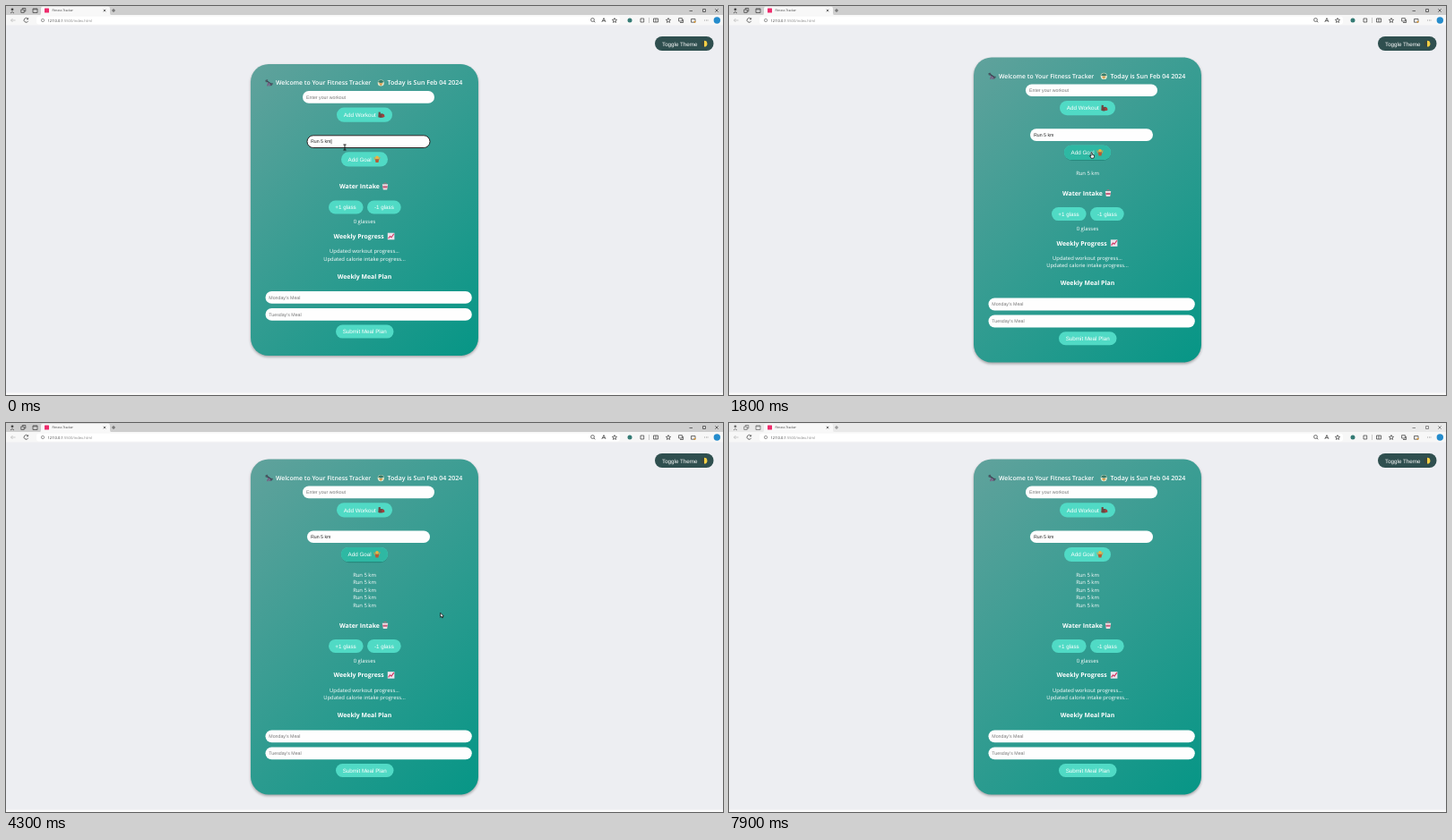
These frames come from a looping animation (800 px wide and 435 px high, 8000 ms). An HTML page:

```html
<!DOCTYPE html>
<html lang="en">
<head>
<meta charset="utf-8">
<title>Fitness Tracker</title>
<style>
  html, body { margin: 0; width: 100%; height: 100%; overflow: hidden; background: #edeef2; }
  svg { display: block; width: 800px; height: 435px; }
  text { font: 5.86px "Open Sans", "Noto Sans", sans-serif; fill: #fff; text-rendering: geometricPrecision; }
  .mid { text-anchor: middle; }
  .head { font-size: 6.9px; font-weight: 700; }
  .btn text { font: 6.25px "Liberation Sans", Arial, sans-serif; }
  .btn rect { fill: #50dac5; }
  .field rect { fill: #fefefe; }
  .field text { font: 5.25px "Liberation Sans", Arial, sans-serif; fill: #777; }
  .field .typed { fill: #222; }
  .line { fill: none; stroke: #4a4a4a; stroke-width: .8; }
  .faint { stroke: #bbb; }
</style>
</head>
<body>
<svg viewBox="0 0 800 435">
  <defs>
    <linearGradient id="teal" gradientUnits="userSpaceOnUse">
      <stop stop-color="#60a29c"/><stop offset="1" stop-color="#069686"/>
    </linearGradient>
    <filter id="soft" x="-10%" y="-10%" width="120%" height="120%"><feGaussianBlur stdDeviation="1.8"/></filter>
  </defs>
  <rect width="800" height="435" fill="#edeef2"/>
  <path d="M0 433.8H800" stroke="#fafafa" stroke-width="2.4"/>

  <!-- browser window -->
  <rect id="strip" width="800" height="11"/>
  <rect y="10" width="800" height="11.5" fill="#f7f7f7"/>
  <path d="M37 10.5Q39 10 39 8V3Q39 .8 41 .8H114Q116 .8 116 3V8Q116 10 118 10.5Z" fill="#f8f8f8"/>
  <rect x="34" y="11.8" width="651" height="8.6" rx="3" fill="#fff"/>
  <g id="tabIcons">
    <path class="line" d="M5 8Q7 5 9 8M16.8 4H20.2V7.4H16.8ZM18.3 4V2.5H21.8V6H20.2M30 3H35V7.5H30ZM30 3.7H35M118 5H122M120 3V7M762.5 5.5H766M777.5 3.5H780.5V6.5H777.5ZM791.3 3.3L794.7 6.7M794.7 3.3L791.3 6.7"/>
    <circle cx="7" cy="3.8" r="1.4" fill="#444"/>
  </g>
  <rect x="43" y="2.5" width="5" height="5" rx=".5" fill="#ee2c6c"/>
  <text x="51.5" y="6.3" style="font-size:3.4px;fill:#333">Fitness Tracker</text>
  <path class="line" d="M108.7 3.8L111.2 6.3M111.2 3.8L108.7 6.3"/>
  <path class="line faint" d="M5.5 16H10.5M7.5 14L5.5 16L7.5 18M717.5 13V19"/>
  <path class="line" d="M24.4 14.4A2.4 2.4 0 1 0 24.7 16.8M24.7 13.3V14.8H23"/>
  <circle class="line" cx="41" cy="16" r="1.7" style="stroke-width:.5"/>
  <text x="46.5" y="17.6" style="font-size:4.1px;fill:#333">127.0.0.1<tspan fill="#888">:5500/index.html</tspan></text>
  <path class="line" d="M656 17L657.3 18.3M664.8 18L667 13.5L669 18M665.7 16.5H668.3M679 13.5L679.8 15.2L681.6 15.4L680.2 16.6L680.6 18.4L679 17.5L677.4 18.4L677.8 16.6L676.4 15.4L678.2 15.2ZM708 14H711.7V18H708ZM722.5 14H727.5V18H722.5ZM725 14V18M739 13.5L739.8 15.2L741.6 15.4L740.2 16.6L740.6 18.4L739 17.5L737.4 18.4L737.8 16.6L736.4 15.4L738.2 15.2ZM750.6 13.7H754.4V17H750.6ZM752 18.5H755.6V15M764.5 14.5H769V18.2H764.5ZM779.3 16H779.9M781 16H781.6M782.7 16H783.3"/>
  <circle class="line" cx="654.5" cy="15.5" r="1.9"/>
  <circle cx="696" cy="16" r="2.5" fill="#347b74"/>
  <circle cx="768.5" cy="17.8" r="1" fill="#e79a27"/>
  <circle cx="793.3" cy="16" r="3.7" fill="#258ccc"/>

  <!-- theme switch -->
  <g class="btn">
    <rect x="724" y="34" width="65.5" height="16" rx="8" style="fill:#2f4f4f"/>
    <text x="732" y="44.5">Toggle Theme</text>
    <path d="M779 38.8A3.4 3.4 0 0 1 779 45.6Z" fill="#f5cf45"/>
    <path d="M779 38.8A3.4 3.4 0 0 0 779 45.6Z" fill="#39483f"/>
  </g>

  <rect id="shadow" x="273" width="254" rx="20" fill="#000" opacity=".32" filter="url(#soft)"/>
  <rect id="card" x="273" width="254" rx="20" fill="url(#teal)"/>

  <g id="upper">
    <g transform="translate(293.5 86)">
      <path d="M-3.8 -3L3.5 2" stroke="#35434c" stroke-width="1.3"/>
      <path d="M-3.5 -1L-1.8 -3.6M2 3L3.9 .3" stroke="#4d5a66" stroke-width="1.5"/>
      <path d="M-.5 -.5L-1.8 3.5M.8 .5L.8 3.5" stroke="#7c5a83" stroke-width="1.4"/>
    </g>
    <text x="301" y="88.4" style="font-size:6.8px;font-weight:600">Welcome to Your Fitness Tracker</text>
    <g transform="translate(418.3 86)">
      <circle r="3.6" fill="#dfe7cf"/>
      <path d="M-3.5 -1Q0 -5.5 3.5 -1L0 .2Z" fill="#377a66"/>
      <path d="M-2.4 .3H2.3L0 3.4Z" fill="#d99a4a"/>
    </g>
    <text x="425.5" y="88.4" style="font-size:7.06px;font-weight:600">Today is Sun Feb 04 2024</text>

    <g class="field">
      <rect x="331" y="95" width="147" height="13.7" rx="6.8"/>
      <text x="335" y="103.5">Enter your workout</text>
    </g>
    <g class="btn">
      <rect x="369" y="113.6" width="62" height="16.2" rx="8.1"/>
      <text x="376.8" y="124.1">Add Workout</text>
      <path d="M415.7 118.4L418 118.7L417.7 120.5Q421.7 119.5 422.3 123.6Q419 126 415.3 124.3Z" fill="#6d4540"/>
      <path d="M419 121.6L422 121.3L422.4 124L419.5 124.7Z" fill="#a3413d"/>
    </g>
    <g class="field">
      <rect id="goalField" x="336" y="144.8" width="137" height="13.7" rx="6.8"/>
      <text class="typed" x="340" y="153.3">Run 5 km</text>
      <path id="caret" d="M363 149V154.3" stroke="#222" stroke-width=".6"/>
    </g>
    <g class="btn">
      <rect x="374.3" y="164" width="51.6" height="16.6" rx="8.2" style="fill:#167d70" id="lift"/>
      <rect x="374" y="163.3" width="52" height="16.2" rx="8.1"/>
      <rect id="hover" x="374" y="163.3" width="52" height="16.2" rx="8.1" style="fill:#2eb8a3"/>
      <text x="381.6" y="173.8">Add Goal</text>
      <circle cx="414" cy="169.4" r="1.9" fill="#f0b33e"/>
      <path d="M411.8 171.2H416.2L415.5 175H412.5Z" fill="#b85a35"/>
      <path d="M411.6 172L410.8 169M416.4 172L417 169" stroke="#d99b44"/>
    </g>
    <g id="goals"></g>
  </g>

  <g id="lower">
    <text class="head" x="372" y="204.4">Water Intake</text>
    <path d="M419.8 199.3H426.2L425.2 205.5H420.8Z" fill="#f0dce2"/>
    <path d="M420.2 201.3H425.8L425.5 203.4H420.5Z" fill="#c4607d"/>
    <path d="M421.2 199L423 197.8L425 199" stroke="#9c7480" fill="none"/>
    <g class="btn">
      <rect x="360" y="217.5" width="38.6" height="15" rx="7.5"/>
      <rect x="403" y="217.5" width="37.7" height="15" rx="7.5"/>
      <text class="mid" x="379" y="227.2">+1 glass</text>
      <text class="mid" x="421.9" y="227.2">-1 glass</text>
    </g>
    <text class="mid" x="400" y="243.2">0 glasses</text>
    <text class="head" x="365.5" y="260">Weekly Progress</text>
    <rect x="425.8" y="253.7" width="7.6" height="7.6" fill="#eee3ec"/>
    <path d="M426.6 260L428.5 257.5L430 258.7L432.8 254.7" fill="none" stroke="#d0335f" stroke-width="1.1"/>
    <text class="mid" x="400" y="276.2">Updated workout progress...</text>
    <text class="mid" x="400" y="284.6">Updated calorie intake progress...</text>
    <text class="head mid" x="400" y="304.9">Weekly Meal Plan</text>
    <g class="field">
      <rect x="289.5" y="319" width="230.3" height="13.8" rx="6.9"/>
      <rect x="289.5" y="338" width="230.3" height="13.8" rx="6.9"/>
      <text x="293.3" y="327.6">Monday's Meal</text>
      <text x="293.3" y="346.6">Tuesday's Meal</text>
    </g>
    <g class="btn">
      <rect x="368" y="356.6" width="64.5" height="15" rx="7.5"/>
      <text class="mid" x="400.2" y="366.3">Submit Meal Plan</text>
    </g>
  </g>

  <g id="pointer">
    <path id="beam" d="M-1.6 -3H1.6M0 -3V3M-1.6 3H1.6" stroke="#111" stroke-width=".9"/>
    <path id="hand" d="M-1 -3.2Q-.2 -3.8 .2 -3V-.8L2.4 -.2Q2.8 2 1.8 3.2H-1L-2.4 .6L-1 .8Z" fill="#fff" stroke="#111" stroke-width=".8"/>
    <path id="arrow" d="M-1.3 -2.8V2.3L-.1 1.3L.8 3L1.6 2.6L.8 1H2.4Z" fill="#fff" stroke="#111" stroke-width=".8"/>
  </g>
</svg>
<script>
const $ = id => document.getElementById(id);
const set = (id, attrs) => { for (const k in attrs) $(id).setAttribute(k, attrs[k]); };
const show = (id, on) => set(id, { visibility: on ? 'visible' : 'hidden' });
const ramp = (t, from, to) => Math.min(1, Math.max(0, (t - from) / (to - from)));

const LOOP = 8000, STEP = 100;
const clicks = [600, 2200, 3200, 3400, 4300];
// pointer keys: time, x, y
const path = [
  [0, 378, 158], [100, 378, 158], [200, 384, 164], [400, 398, 171], [800, 401, 170],
  [1200, 402, 169], [1500, 404, 168], [1700, 405, 167], [2600, 405, 167], [2800, 405, 162],
  [3100, 405, 162], [3400, 405, 153], [4200, 405, 153], [4300, 486, 215],
  [4600, 506, 234], [4700, 506, 234], [5200, 820, 260], [LOOP, 820, 260]
];

clicks.forEach((_, i) => {
  const goal = document.createElementNS('http://www.w3.org/2000/svg', 'text');
  goal.textContent = 'Run 5 km';
  goal.setAttribute('class', 'mid');
  goal.setAttribute('x', 400);
  goal.setAttribute('y', 196.4 + 8.42 * i);
  $('goals').append(goal);
});

function pointerAt(t) {
  const i = path.findIndex(key => key[0] > t);
  const [t0, x0, y0] = path[i - 1], [t1, x1, y1] = path[i];
  const p = ramp(t, t0, t1);
  return [x0 + (x1 - x0) * p, y0 + (y1 - y0) * p];
}

function draw(t) {
  const count = clicks.filter(c => t >= c).length;
  const grow = count && 3.4 + 4.2 * count;

  // the card stays centred, so it grows both ways
  const y = 65 - grow, height = 326 + 2 * grow, reach = (254 + height) / 4;
  set('card', { y, height });
  set('shadow', { y: y + 1.6, height });
  set('teal', { x1: 400 - reach, y1: 228 - reach, x2: 400 + reach, y2: 228 + reach });
  set('upper', { transform: `translate(0 ${-grow})` });
  set('lower', { transform: `translate(0 ${grow})` });
  [...$('goals').children].forEach((goal, i) => goal.style.display = i < count ? '' : 'none');

  const focused = t < 500;
  show('caret', focused);
  set('goalField', { stroke: focused ? '#2a2424' : 'none' });

  const hover = ramp(t, 300, 500) * (1 - ramp(t, 4300, 4700));
  set('hover', { opacity: hover });
  set('lift', { opacity: hover * .6 });

  const active = t < 5100;
  set('strip', { fill: active ? '#cecece' : '#e9e9e9' });
  set('tabIcons', { opacity: active ? 1 : .75 });

  set('pointer', { transform: `translate(${pointerAt(t)})` });
  show('beam', t < 200);
  show('hand', t >= 200 && t < 4300);
  show('arrow', t >= 4300);
}

function tick() {
  draw(Math.floor(performance.now() % LOOP / STEP) * STEP);
  requestAnimationFrame(tick);
}
tick();
</script>
</body>
</html>
```
